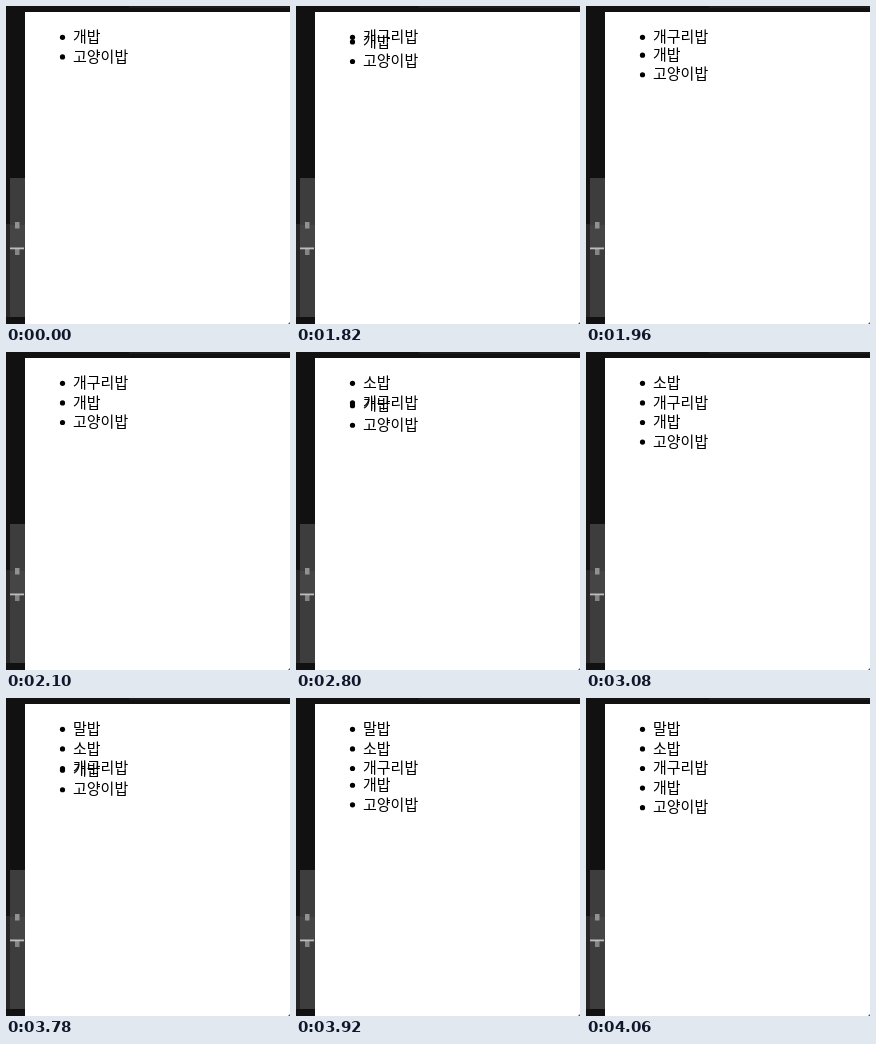
Write an HTML page that moves like this. It is 284 by 318 pixels and loops after 4970 ms.

```html
<!DOCTYPE html>
<html lang="ko">
<head>
<meta charset="utf-8">
<title>밥 목록</title>
<style>
  html, body { margin: 0; width: 100%; height: 100%; overflow: hidden; background: #fff; }
  svg { display: block; width: 284px; height: 318px; }
  text { font: 15px "Noto Sans CJK KR", "Noto Sans CJK", "Noto Sans CJK JP", sans-serif; fill: #000; }
</style>
</head>
<body>
<svg viewBox="0 0 284 318">
  <rect width="284" height="318" fill="#111"/>
  <rect x="123" width="161" height="2" fill="#1c1a1b"/>
  <rect y="218" width="4" height="93" fill="#272727"/>
  <rect x="4" y="172" width="15" height="139" fill="#3d3d3d"/>
  <rect x="4" y="219" width="15" height="23" fill="#454545"/>
  <rect x="9" y="216" width="4.5" height="6.5" fill="#919191"/>
  <rect x="9" y="242" width="4.5" height="7" fill="#858585"/>
  <rect x="4" y="241.5" width="14" height="1.8" fill="#bdbdbd"/>
  <rect x="19" y="6" width="265" height="312" fill="#fff"/>
  <path d="M284 316v2h-2z" fill="#555"/>
  <g id="list"></g>
</svg>
<script>
const NS = 'http://www.w3.org/2000/svg';
const LOOP = 4970, TICK = 70, MOVE = 300, PITCH = 19.6;

// Each insert goes on top; lead is how far the slide has run when it appears.
const inserts = [
  { name: '개구리밥', at: 1820, lead: 52 },
  { name: '소밥', at: 2800, lead: 38 },
  { name: '말밥', at: 3780, lead: 28 }
];
const base = ['개밥', '고양이밥'];

function make(tag, attrs, parent) {
  const el = document.createElementNS(NS, tag);
  for (const key in attrs) el.setAttribute(key, attrs[key]);
  return parent.appendChild(el);
}

const list = document.getElementById('list');
function addItem(name) {
  const g = make('g', {}, list);
  make('circle', { cx: 56.5, cy: 31.3, r: 2.6 }, g);
  make('text', { x: 67, y: 36 }, g).textContent = name;
  return g;
}
const baseItems = base.map(addItem);
const newItems = inserts.map(item => addItem(item.name));

// CSS "ease": cubic-bezier(.25, .1, .25, 1)
function ease(x) {
  if (x <= 0) return 0;
  if (x >= 1) return 1;
  const curve = (a, b, s) => 3 * a * s * (1 - s) ** 2 + 3 * b * s * s * (1 - s) + s ** 3;
  let lo = 0, hi = 1;
  for (let i = 0; i < 24; i++) {
    const mid = (lo + hi) / 2;
    if (curve(.25, .25, mid) < x) lo = mid; else hi = mid;
  }
  return curve(.1, 1, lo);
}

function place(el, row) {
  el.setAttribute('transform', `translate(0 ${(row * PITCH).toFixed(2)})`);
}

function draw(ms) {
  const t = Math.floor((ms % LOOP) / TICK) * TICK;
  const shown = inserts.filter(item => t >= item.at).length;
  // Older inserts jump a row; the two base rows slide.
  newItems.forEach((el, i) => {
    el.setAttribute('visibility', i < shown ? 'visible' : 'hidden');
    place(el, Math.max(0, shown - 1 - i));
  });
  const shift = inserts.reduce((sum, item) =>
    sum + (t >= item.at ? ease((t - item.at + item.lead) / MOVE) : 0), 0);
  baseItems.forEach((el, i) => place(el, i + shift));
}

let start;
function frame(now) {
  if (start === undefined) start = now;
  draw(now - start);
  requestAnimationFrame(frame);
}
draw(0);
requestAnimationFrame(frame);
</script>
</body>
</html>
```
